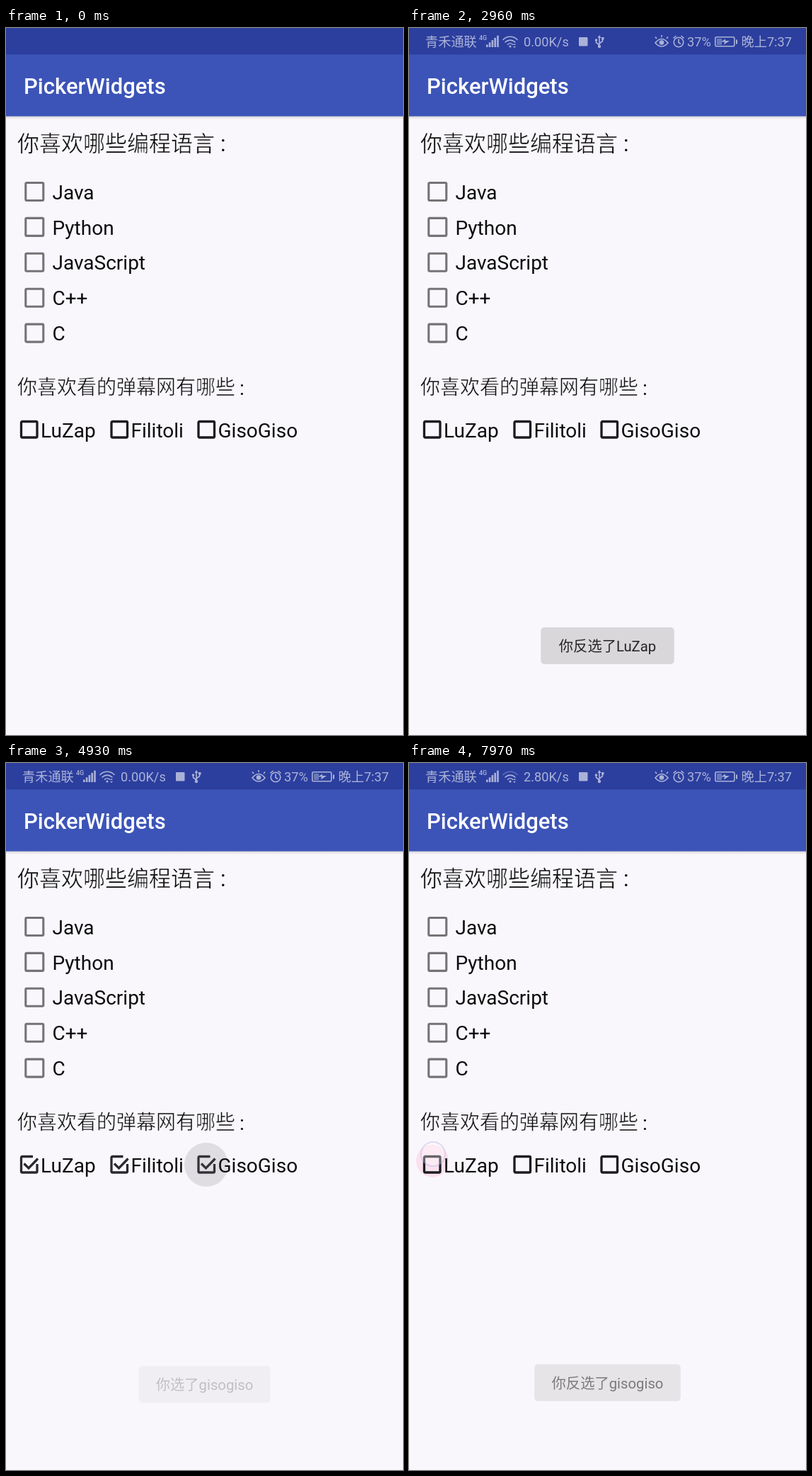
An HTML page for the animation above (8 s loop, 561 by 998 pixels).

```html
<!DOCTYPE html>
<html lang="zh-CN">
<head>
<meta charset="utf-8">
<title>Checkboxes</title>
<style>
  html, body { margin: 0; width: 100%; height: 100%; overflow: hidden; background: #f9f7fb; }
  svg { display: block; width: 561px; height: 998px; }
  text { font-family: Roboto, "Noto Sans CJK SC", "Noto Sans CJK", sans-serif; fill: #0c0c0e; }
  .title { font-size: 31px; font-weight: 500; fill: #fff; }
  /* the background-coloured edge thins the strokes */
  .ask { font-weight: 300; stroke: #f9f7fb; stroke-width: .55; }
  .item { font-size: 28px; }
  .line { fill: none; stroke: #fff; stroke-width: 1.6; }
  .solid { fill: #fff; }
  #status { opacity: 0; }
  #status text { font-size: 18.2px; fill: #fff; }
  #status .tiny { font-size: 9px; font-weight: 500; }
  .grey { fill: none; stroke: #747376; stroke-width: 3.1; }
  .dark { fill: none; stroke: #1b1b20; stroke-width: 3.3; }
  .tick { fill: none; stroke: #29292e; stroke-width: 3.3; }
  .toast text { font-size: 20.3px; fill: #242426; text-anchor: middle; }
</style>
</head>
<body>
<svg viewBox="0 0 561 998">
  <defs>
    <linearGradient id="shade" x2="0" y2="1">
      <stop stop-color="#000" stop-opacity=".16"/>
      <stop offset="1" stop-color="#000" stop-opacity="0"/>
    </linearGradient>
  </defs>
  <rect width="561" height="998" fill="#f9f7fb"/>
  <rect y="124" width="561" height="5" fill="url(#shade)"/>
  <rect y="37" width="561" height="87.600" fill="#3c54b7"/>
  <rect width="561" height="37.400" fill="#2c3f9e"/>

  <g id="status">
    <g opacity=".6">
      <text x="23" y="26">青禾通联</text>
      <text class="tiny" x="99" y="17">4G</text>
      <g id="bars" class="solid"></g>
      <path id="wifiTop" class="line" d="M133 16.500a14 14 0 0 1 20 0" stroke-linecap="round"/>
      <path class="line" d="M136 20a10 10 0 0 1 14 0M139.500 23.200a5 5 0 0 1 7 0" stroke-linecap="round"/>
      <circle class="solid" cx="143" cy="26" r="1.600"/>
      <path class="solid" d="M147 24l2-2 2 2zM147 26h4l-2 2z"/>
      <text id="speed" x="162" y="26"></text>
      <rect class="solid" x="240" y="13" width="12.500" height="12.500" rx="1"/>
      <path class="line" d="M269 12v14M269 24l-4.500-3.500v-3M269 22l4.500-3.500v-3"/>
      <path class="solid" d="M266.500 14l2.500-4 2.500 4zM272 13h3.500v3.500h-3.500z"/>
      <circle class="solid" cx="264.500" cy="17" r="1.800"/>
      <circle class="solid" cx="269" cy="26" r="2.200"/>
      <path class="line" d="M348 21q9-11 18 0q-9 10-18 0zM350 15l-2-2.500M357 13v-3M364 15l2-2.500"/>
      <circle class="solid" cx="357" cy="20.500" r="3.300"/>
      <circle class="line" cx="381" cy="20" r="6.800"/>
      <path class="line" d="M381 15.500v5l3 2M373.500 14.500l4-3.500M388.500 14.500l-4-3.500"/>
      <text x="393" y="26">37%</text>
      <rect class="line" x="432.800" y="12.800" width="27" height="13" rx="2"/>
      <path class="solid" d="M462 16.500h2v6h-2z"/>
      <path class="solid" opacity=".5" d="M435 15h7v9h-7z"/>
      <path class="solid" d="M447 15.500l-6 4h5l-1 4 8-5.500h-6z"/>
      <text id="clock" x="469.500" y="26"></text>
    </g>
  </g>

  <text class="title" x="25" y="93">PickerWidgets</text>
  <text class="ask" x="16" y="174" font-size="31">你喜欢哪些编程语言</text>
  <text x="303" y="174" font-size="31">:</text>
  <g id="langs"></g>
  <text class="ask" x="16" y="517" font-size="28">你喜欢看的弹幕网有哪些</text>
  <text x="330" y="517.500" font-size="28">:</text>
  <circle id="ripple"/>
  <g id="sites"></g>
  <circle id="pointer" fill="#fff" fill-opacity=".62" stroke="#b9b3ea" stroke-opacity=".8" stroke-width="2" r="17"/>
  <g id="oldToast" class="toast"><rect/><text/></g>
  <g id="newToast" class="toast"><rect/><text/></g>
</svg>
<script>
const LOOP = 8000;
const $ = id => document.getElementById(id);
const clamp = v => Math.max(0, Math.min(1, v));
const ramp = (t, a, b) => clamp((t - a) / (b - a));
const setAttrs = (el, attrs) => {
  for (const k in attrs) el.setAttribute(k, attrs[k]);
};

const sites = [
  { x: 20, label: 'LuZap', said: 'LuZap', width: 168 },
  { x: 147.5, label: 'Filitoli', said: 'filitoli', width: 162 },
  { x: 270.5, label: 'GisoGiso', said: 'gisogiso', width: 186 }
];

// Each tap: site index, press, toast settled, ripple gone, finger position
const taps = [
  [0, 1570, 1960, 2000, 35, 556],
  [0, 2460, 2920, 2960, 35, 556],
  [0, 3540, 3926, 4040, 38, 557],
  [1, 4060, 4440, 4560, 163, 561],
  [2, 4580, 5000, 5000, 285, 565],
  [1, 5320, 5780, 5820, 163, 562],
  [2, 6640, 7070, 7110, 287.5, 566],
  [0, 7790, 8210, 8250, 34, 552]
].map(([site, press, shown, end, x, y]) => ({ site, press, shown, end, x, y }));

const state = [false, false, false];
for (const tap of taps) {
  tap.on = state[tap.site] = !state[tap.site];
  const s = sites[tap.site];
  tap.text = (tap.on ? '你选了' : '你反选了') + s.said;
  tap.width = s.width + (tap.on ? 0 : 20.5);
}

$('bars').innerHTML = [0, 1, 2, 3, 4].map(i =>
  `<rect x="${109 + i * 3.8}" y="${23.5 - i * 3.2}" width="2.6" height="${3.5 + i * 3.2}"/>`).join('');

$('langs').innerHTML = ['Java', 'Python', 'JavaScript', 'C++', 'C'].map((name, i) => {
  const y = 231 + i * 49.9;
  return `<rect class="grey" x="27.8" y="${y - 12.5}" width="25" height="25" rx="1.5"/>
    <text class="item" x="65.5" y="${y + 10.6}">${name}</text>`;
}).join('');

$('sites').innerHTML = sites.map(({ x, label }) =>
  `<g transform="translate(${x} 554)">
    <rect class="dark" x="1.5" y="1.5" width="22.5" height="22.5" rx="1.5"/>
    <path class="tick" d="M18 1.5H3a1.5 1.5 0 0 0-1.5 1.5V22.5a1.5 1.5 0 0 0 1.5 1.5H22.5a1.5 1.5 0 0 0 1.5-1.5V12M5.5 11.5l6.5 6.5L25 4.5"/>
    <text class="item" x="29" y="24">${label}</text>
  </g>`).join('');

const boxes = [...$('sites').children].map(g => ({
  empty: g.querySelector('.dark'),
  tick: g.querySelector('.tick')
}));

function drawToast(el, tap, alpha) {
  el.setAttribute('opacity', tap ? alpha : 0);
  if (!tap) return;
  el.setAttribute('transform', `translate(0 ${7 * (1 - alpha)})`);
  setAttrs(el.firstChild, {
    x: 280.5 - tap.width / 2, y: 846, width: tap.width, height: 52, rx: 5, fill: '#d9d7da'
  });
  setAttrs(el.lastChild, { x: 280.5, y: 880 });
  if (el.lastChild.textContent !== tap.text) el.lastChild.textContent = tap.text;
}

function drawTouch(tap, t) {
  const age = tap ? t - tap.press : Infinity;
  const active = tap && t < tap.end;
  $('pointer').setAttribute('opacity', active ? clamp(1 - age / 380) : 0);
  $('ripple').setAttribute('opacity', active ? ramp(age, 20, 120) * (1 - ramp(t, tap.end - 60, tap.end)) : 0);
  if (!active) return;
  setAttrs($('pointer'), { cx: tap.x, cy: tap.y });
  const grow = ramp(age, 40, 320);
  const slide = clamp(grow * 1.3);
  const cx = sites[tap.site].x + 12.5;
  setAttrs($('ripple'), {
    cx: tap.x + (cx - tap.x) * slide,
    cy: tap.y + (567 - tap.y) * slide,
    r: 15 + 16 * grow,
    fill: tap.on ? 'rgba(0,0,0,.105)' : 'rgba(255,64,129,.12)'
  });
}

function draw(t) {
  $('status').style.opacity = t < 40 ? 0 : 0.2 + 0.8 * ramp(t, 40, 180);
  $('clock').textContent = t < 1430 ? '晚上7:36' : '晚上7:37';
  $('speed').textContent = t < 2640 ? '13.3B/s' : t < 5640 ? '0.00K/s' : '2.80K/s';
  $('wifiTop').setAttribute('opacity', t < 6000 ? 1 : 0.4);

  const checked = [false, false, false];
  let last = -1;
  taps.forEach((tap, i) => {
    if (t >= tap.press) last = i;
    if (t >= tap.press + 130) checked[tap.site] = tap.on;
  });
  boxes.forEach((box, i) => {
    box.empty.setAttribute('opacity', checked[i] ? 0 : 1);
    box.tick.setAttribute('opacity', checked[i] ? 1 : 0);
  });

  const tap = taps[last];
  drawTouch(tap, t);
  drawToast($('oldToast'), taps[last - 1], tap ? 1 - ramp(t, tap.press + 140, tap.press + 240) : 0);
  drawToast($('newToast'), tap, tap ? ramp(t, tap.shown - 140, tap.shown) ** 2 : 0);
}

const start = performance.now();
function tick() {
  draw((performance.now() - start) % LOOP);
  requestAnimationFrame(tick);
}
tick();
</script>
</body>
</html>
```
